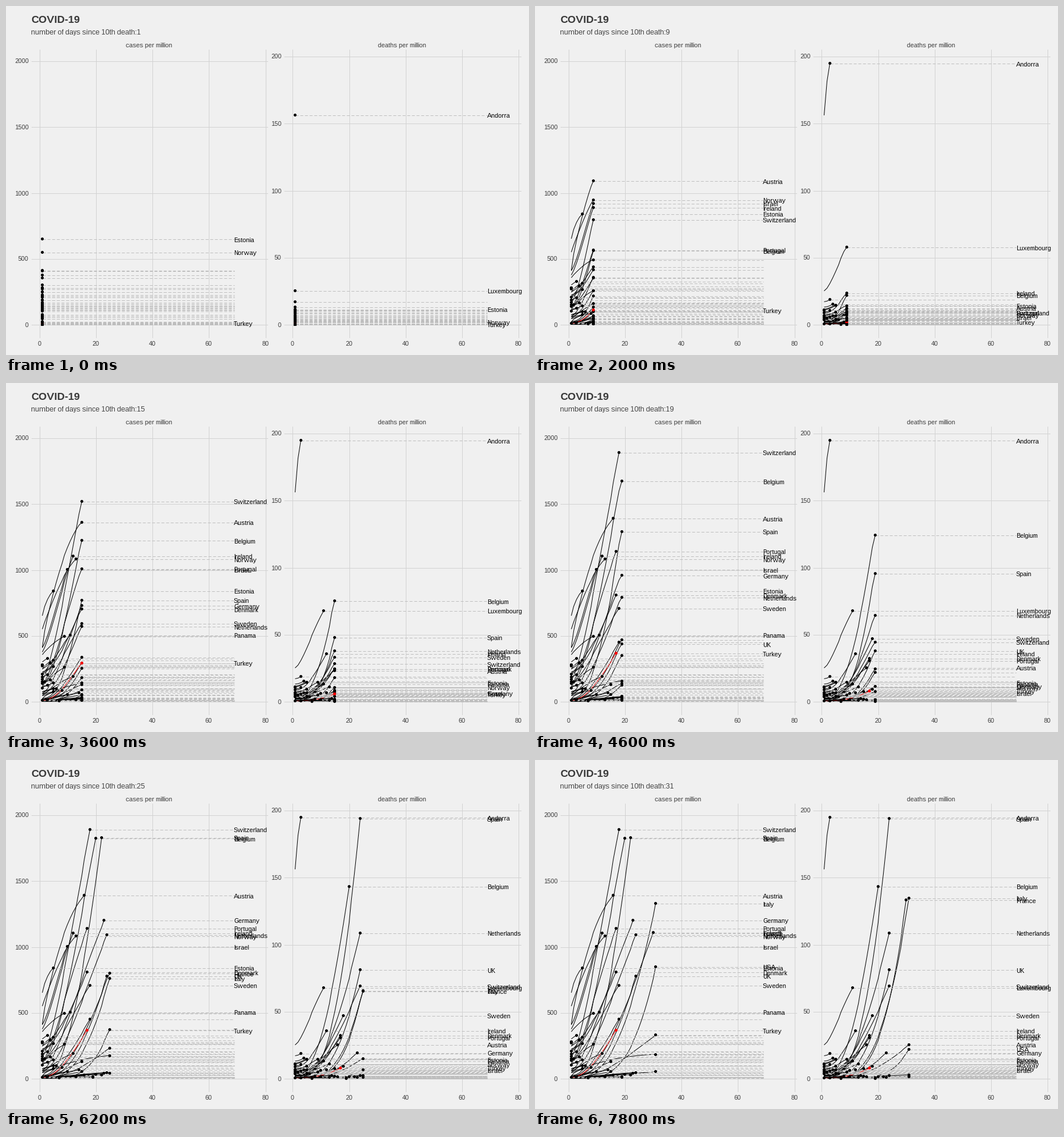
These frames come from a looping animation (900x600 px, 8000 ms). A matplotlib script:

```python
import matplotlib.pyplot as plt
import numpy as np
from matplotlib.animation import FuncAnimation
from matplotlib.collections import LineCollection

plt.rcParams.update({
    "font.family": "Liberation Sans",
    "text.hinting": "native",
    "text.hinting_factor": 1,
})

W, H, DPI = 900, 600, 100
PX = 72 / DPI
FRAMES, INTERVAL = 40, 200
DAYS_PER_FRAME = 76 / 99
LABEL_DAY = 69
MAX_CASES = 1990
BG, GRID, INK, DASH = "#F0F0F0", "#D2D2D2", "#3C3C3C", "#BEBEBE"

rng = np.random.default_rng(19)
countries = []


class Panel:
    def __init__(self, title, x0, y_unit, step, top):
        self.title, self.x0, self.y_unit = title, x0, y_unit
        self.ticks = range(0, top + 1, step)

    def x(self, day):
        return self.x0 + 4.863 * np.asarray(day, float)

    def y(self, value):
        return 547.5 - self.y_unit * np.asarray(value, float)


PANELS = (Panel("cases per million", 57.15, 0.2265, 500, 2000),
          Panel("deaths per million", 492.85, 2.305, 50, 200))


def early_share(end):
    """Part of the final value already reached on day 1."""
    return np.exp(-(end / 10) ** 2)


def curve(end, first, last, bend):
    """Power-law growth by day that flattens a little near its end."""
    u = np.linspace(0, 1, end) if end > 1 else np.ones(1)
    return first + (last - first) * u ** bend * (1 + 0.6 * (1 - u))


def add(name, end, c0, c1, d1, bend, lag=0.7):
    """Deaths follow cases with a sharper bend; cases stop at the axis limit."""
    cases = curve(end, c0, c1, bend)
    deaths = curve(end, d1 * early_share(end), d1, bend + lag)
    countries.append((name, cases[cases <= MAX_CASES], deaths))


def add_minor():
    end = 1 + int(24 * rng.random() ** 2)
    last = 4 + 400 * rng.random() ** 2 * np.exp(-(end / 16) ** 2)
    add("", end, last * early_share(end), last,
        0.035 * last * rng.uniform(0.5, 1.7), rng.uniform(1, 2))


# name, last day, first and last cases, last deaths, bend
countries.append(("Andorra", None, curve(3, 156, 195, 1)))
countries.append(("Luxembourg", None, curve(11, 25, 67.5, 1.5)))
add("Austria", 16, 410, 1391, 25, 0.93)
add("Belgium", 20, 130, 1825, 143, 1.85)
add("Denmark", 17, 225, 808, 32.3, 1.9)
add("Estonia", 5, 651, 839, 14.5, 0.98)
add("France", 30, 11, 1108, 133, 2.2, lag=1.9)
add("Germany", 23, 58, 1199, 19.3, 1.58, lag=1.4)
add("Ireland", 12, 375, 1104, 35.6, 1.45)
add("Israel", 10, 408, 1003, 6.2, 1.5)
add("Italy", 31, 5, 1336, 135.3, 2.97)
add("Netherlands", 24, 56, 1092, 108.5, 1.8)
add("Norway", 13, 549, 1082, 11, 1.1)
add("Panama", 11, 215, 505, 13, 1.5)
add("Portugal", 17, 125, 1139, 30.3, 1.5)
for _ in range(40):
    add_minor()
add("", 31, 1, 331, 25.3, 2.1)
add("", 31, 19, 183, 2.6, 0.75)
add("", 31, 1, 51, 1.5, 1.5)
add("", 18, 12, 450, 9, 2)
add("", 9, 355, 495, 14.5, 1.1)
add("Spain", 24, 23, 2174, 194, 2.5)
add("Sweden", 18, 140, 707, 47, 1.6)
add("Switzerland", 24, 160, 2512, 69, 1.5)
add("Turkey", 17, 8, 366, 7.6, 2.1)
add("UK", 24, 12, 778, 81, 2.72)
add("USA", 31, 1, 853, 22.1, 4.1, lag=1.6)

fig = plt.figure(figsize=(W / DPI, H / DPI), dpi=DPI, facecolor=BG)
ax = fig.add_axes([0, 0, 1, 1])
ax.set(xlim=(0, W), ylim=(H, 0))
ax.axis("off")


def centre(v):
    """Middle of the pixel that holds a coordinate."""
    return np.floor(v) + 0.5


def label(x, y, text, size, color=INK, **kw):
    return ax.text(x, y, text, fontsize=size * PX, color=color, va="baseline", **kw)


def grid_line(xs, ys):
    ax.plot(xs, ys, color=GRID, lw=PX, zorder=1)


label(43, 29, "COVID-19", 18, weight="bold")
counter = label(43, 49, "", 12)
for p in PANELS:
    left, right = p.x(-2.8), p.x(80.8)
    label(round(p.x0 + 188.7), 71, p.title, 10.6, ha="center")
    for day in range(0, 81, 20):
        x = centre(p.x(day))
        grid_line([x, x], [75, 570])
        label(x, 584, str(day), 10.6, ha="center")
    for v in p.ticks:
        y = centre(p.y(v))
        grid_line([left, right], [y, y])
        label(round(left) - 5, y + 4, str(v), 10.6, ha="right")


class Layer:
    """All moving parts of one panel."""

    def __init__(self, panel, which):
        self.panel = panel
        self.rows = [(c[0], c[1 + which]) for c in countries if c[1 + which] is not None]
        colors = ["red" if n == "Turkey" else "black" for n, _ in self.rows]
        self.paths = LineCollection([], colors=colors, linewidths=PX, zorder=2)
        self.leads = LineCollection([], colors=DASH, linewidths=PX,
                                    linestyles=[(0, (5, 3))], zorder=3)
        for lines in (self.paths, self.leads):
            ax.add_collection(lines, autolim=False)
        n = len(self.rows)
        self.dots = ax.scatter(np.zeros(n), np.zeros(n), s=(5 * PX) ** 2,
                               c=colors, linewidths=0, zorder=4)
        x = int(panel.x(LABEL_DAY))
        self.names = {name: label(x, 0, name, 11, "black", zorder=5)
                      for name, _ in self.rows if name}

    def update(self, t, shown):
        p, paths, leads, dots = self.panel, [], [], []
        for name, values in self.rows:
            end = len(values)
            now = min(t, end)
            past = np.arange(1, int(now) + 1)
            head = np.interp(now, np.arange(1, end + 1), values)
            hx, hy = centre(p.x(round(now))), centre(p.y(head))
            paths.append(np.column_stack([np.r_[centre(p.x(past)), hx],
                                          np.r_[p.y(values[:len(past)]), hy]]))
            leads.append([(hx, hy), (p.x(LABEL_DAY), hy)])
            dots.append((hx, hy))
            if name:
                self.names[name].set_visible(name in shown)
                self.names[name].set_y(hy + 5)
        self.paths.set_segments(paths)
        self.leads.set_segments(leads)
        self.dots.set_offsets(dots)


layers = [Layer(p, i) for i, p in enumerate(PANELS)]


def is_labelled(name, cases, deaths, day):
    if name == "Turkey" or cases is None:
        return True
    return (cases[min(day, len(cases)) - 1] > 500
            or deaths[min(day, len(deaths)) - 1] > 39)


def draw(frame):
    t = 1 + frame * DAYS_PER_FRAME
    day = round(t)
    counter.set_text(f"number of days since 10th death:{day}")
    shown = {c[0] for c in countries if c[0] and is_labelled(*c, day)}
    for layer in layers:
        layer.update(t, shown)
    return []


anim = FuncAnimation(fig, draw, frames=FRAMES, interval=INTERVAL,
                     init_func=lambda: draw(0), repeat=True, blit=False)
plt.show()
```
